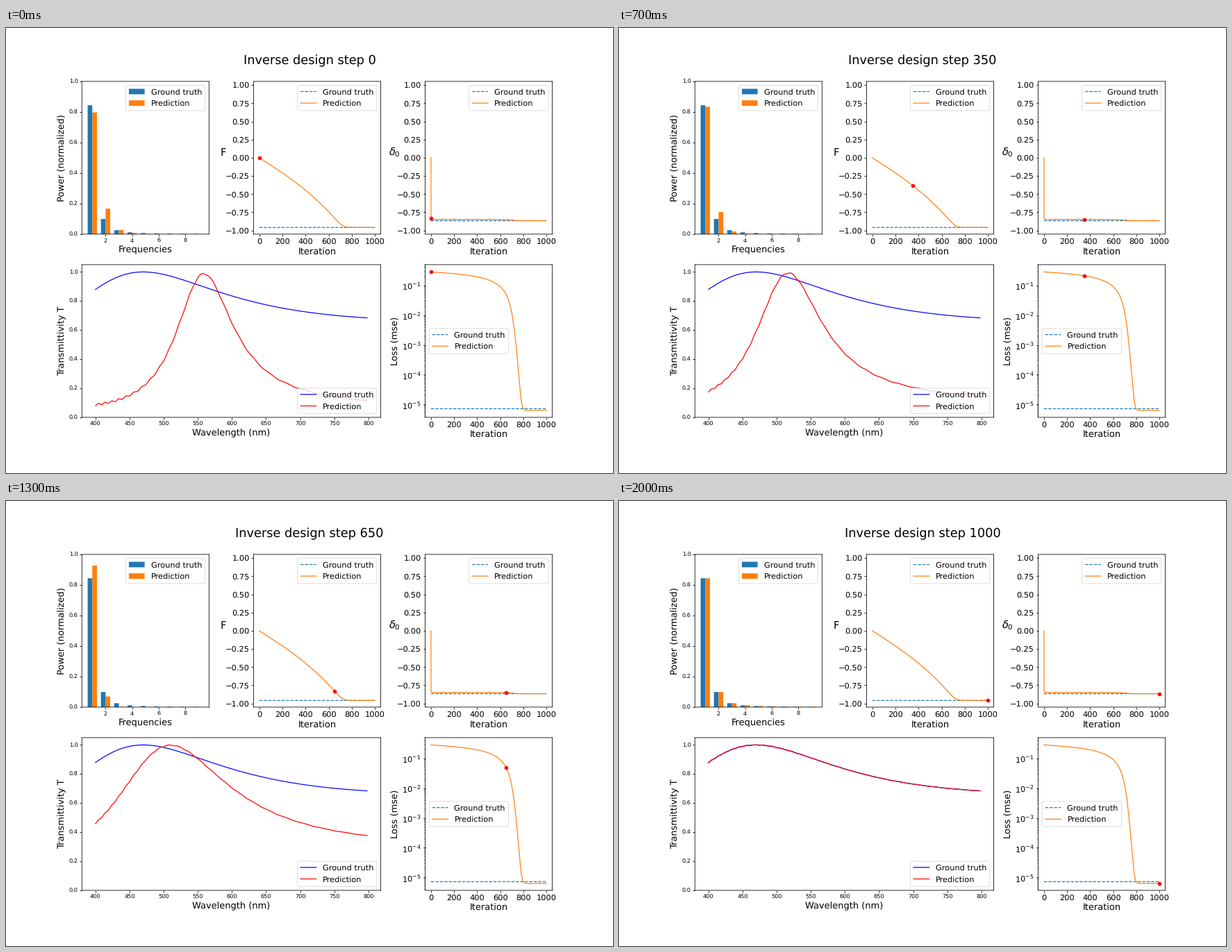
A matplotlib script that plays this animation: 874x641 px, repeating every 2.1 s.

```python
import numpy as np
import matplotlib.pyplot as plt
from matplotlib.animation import FuncAnimation

W, H, DPI = 874, 641, 58.267
FRAMES, STRIDE = 21, 50
BLUE, ORANGE = "C0", "C1"
F_TRUE, D_TRUE, LOSS_TRUE, LOSS_END = -0.9583, -0.8655, 7.2e-6, 6.3e-6
PEAK_TRUE, C_TRUE = 470, 0.5

plt.rcParams.update({"font.family": "DejaVu Sans", "font.size": 10,
                     "text.hinting": "none", "path.snap": False,
                     "axes.linewidth": 1, "xtick.major.width": 1,
                     "ytick.major.width": 1, "legend.fontsize": 14,
                     "legend.labelspacing": 0.53, "axes.labelsize": 16})
wave = np.arange(400, 800, 2.0)
its = np.arange(1001)


def design(it):
    """F falls along a cubic and settles softly on its true value."""
    t = np.asarray(it) / 1000
    u, soft = 1.02 * t + 0.6 * t**3, 0.035
    return -(u - soft * np.log1p(np.exp((u + F_TRUE) / soft)))


def gap(it):
    """Remaining distance to the solution, from 1 down to 0."""
    return 1 - design(it) / F_TRUE


def peak(it):
    """Wavelength of the maximum: a fast first jump, then locked to F."""
    return (PEAK_TRUE + 47 * (1 - np.exp(-13.8 * gap(it)))
            + 42 * np.exp(-np.asarray(it) / 8))


def delta(it):
    return D_TRUE + (peak(it) - PEAK_TRUE) / 2770


def airy(c, p):
    """Transmission of a resonator with finesse c and peak p."""
    return 1 / (1 + c * np.sin(np.pi * p / wave) ** 2)


def model(it):
    it = np.asarray(it)[..., None]
    return airy(C_TRUE + 11 * gap(it), peak(it))


def loss(it):
    return np.mean((model(it) - truth) ** 2, axis=-1) + LOSS_END


def spectrum(it):
    g = gap(it)
    amp = (0.003 + 0.004 * g) * np.exp(-(wave - 400) / 300)
    ripple = amp * np.cos(2 * np.pi * (18000 / wave - 43.478))
    return np.minimum(model(it) * (1 - 0.012 * g) + ripple, 1)


def power(curve):
    p = np.abs(np.fft.rfft(curve))[1:10] ** 2
    return p / p.sum()


truth = airy(C_TRUE, PEAK_TRUE)

fig = plt.figure(figsize=(W / DPI + 1e-6, H / DPI + 1e-6), dpi=DPI, facecolor="white")
grid = fig.add_gridspec(2, 3, left=0.125, right=0.9, bottom=0.125, top=0.88,
                        wspace=0.35, hspace=0.2)
title = fig.suptitle("", fontsize=22, y=0.94)

# Harmonic powers
ax = fig.add_subplot(grid[0, 0])
freq, width = np.arange(1, 10), 0.35
ax.bar(freq - width / 2, power(truth), width, color=BLUE, label="Ground truth")
bars = ax.bar(freq + width / 2, power(truth), width, color=ORANGE, label="Prediction")
ax.set(ylim=(0, 1), xticks=range(2, 9, 2),
       xlabel="Frequencies", ylabel="Power (normalized)")
ax.legend(loc="upper right")


def history(cell, values, target, loc):
    """Value over iterations, with its target and a moving dot."""
    ax = fig.add_subplot(cell)
    ax.plot([0, 1000], [target, target], "--", color=BLUE, label="Ground truth")
    ax.plot(its, values, color=ORANGE, label="Prediction")
    dot, = ax.plot([0], [values[-1]], "ro")
    ax.set(xlim=(-50, 1050), xticks=range(0, 1001, 200), xlabel="Iteration")
    ax.tick_params(labelsize=14)
    ax.legend(loc=loc)
    return ax, dot


# The phase starts at zero and is kicked slightly every 100 iterations
phase = delta(its) + 0.006 * np.exp(-(its % 100) / 8) * (its >= 100) * (its < 600)
phase[0] = 0
dots = []
for col, values, target, name in ((1, design(its), F_TRUE, "F"),
                                  (2, phase, D_TRUE, r"$\delta_0$")):
    ax, dot = history(grid[0, col], values, target, "upper right")
    ax.set(ylim=(-1.05, 1.05), yticks=np.arange(-1, 1.01, 0.25))
    ax.set_ylabel(name, fontsize=18, rotation=0)
    dots.append(dot)

ax, dot = history(grid[1, 2], loss(its), LOSS_TRUE, "center left")
ax.set(yscale="log", ylim=(10**-5.434, 10**-0.296), ylabel="Loss (mse)")
dots.append(dot)

# Transmission spectrum
ax = fig.add_subplot(grid[1, :2])
ax.plot(wave, truth, "b", label="Ground truth")
line, = ax.plot(wave, truth, "r", label="Prediction")
ax.set(xlim=(380.1, 817.9), xticks=range(400, 801, 50),
       ylim=(0, 1.05), yticks=np.arange(0, 1.01, 0.2),
       xlabel="Wavelength (nm)", ylabel="Transmittivity T")
ax.legend(loc="lower right")


def update(i):
    it = i * STRIDE
    title.set_text(f"Inverse design step {it}")
    curve = spectrum(it)
    line.set_ydata(curve)
    for bar, p in zip(bars, power(curve)):
        bar.set_height(p)
    for dot, track in zip(dots, (design, delta, loss)):
        dot.set_data([it], [float(track(it))])
    return [title, line, *bars, *dots]


anim = FuncAnimation(fig, update, frames=FRAMES, interval=100,
                     init_func=lambda: update(0), repeat=True, repeat_delay=0)
plt.show()
```
